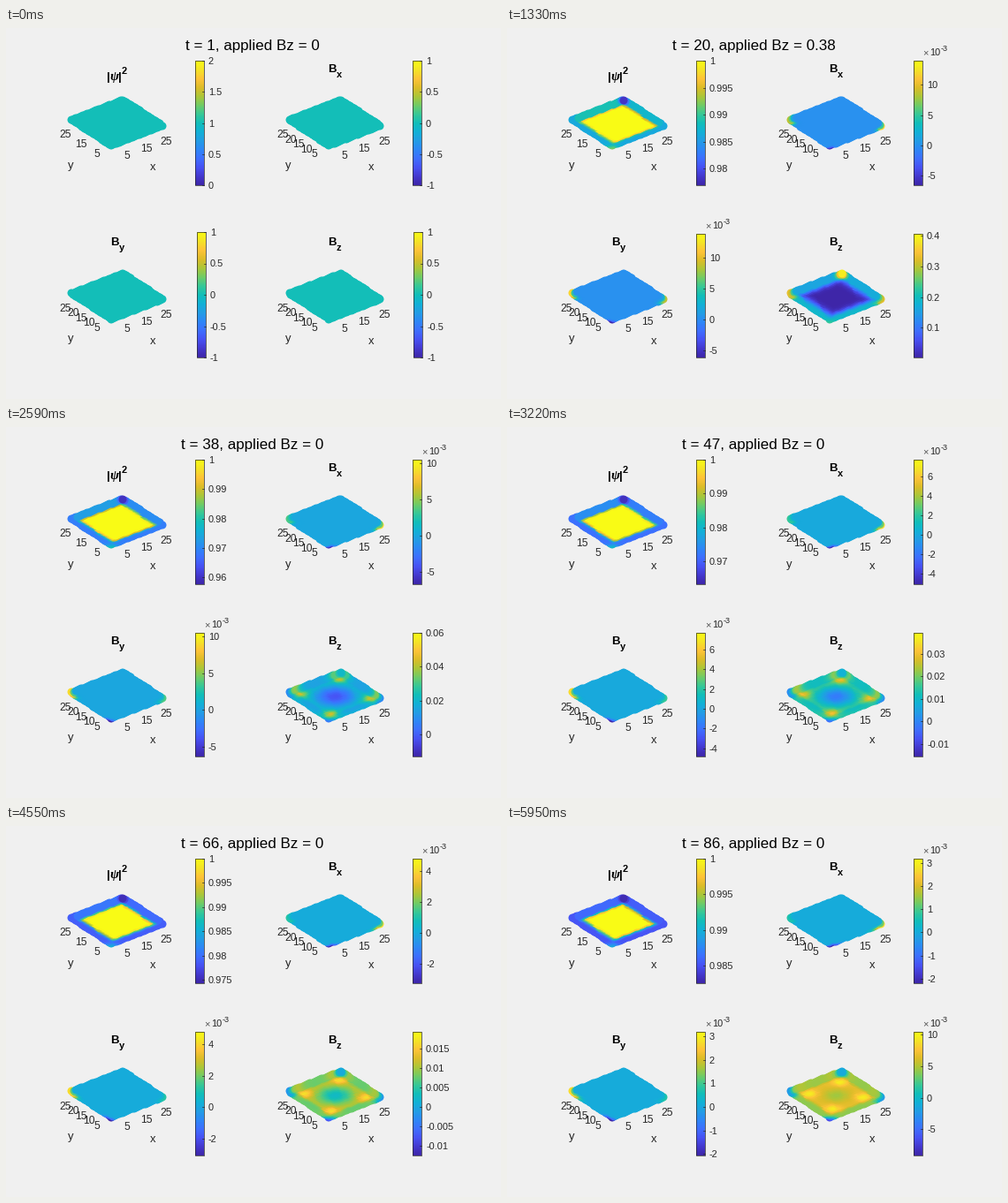
Write a matplotlib script that moves like this. It is 560 px wide and 420 px high and loops after 6020 ms.

```python
import numpy as np
import matplotlib.pyplot as plt
from matplotlib.animation import FuncAnimation
from matplotlib.colors import LinearSegmentedColormap
from matplotlib.patches import Rectangle

W, H, DPI = 560, 420, 100
STEPS, INTERVAL = 86, 70
RAMP_END = 20
INK = "#262626"
N = 28
SPAN = N - 1

plt.rcParams["font.family"] = "Liberation Sans"

PARULA = LinearSegmentedColormap.from_list("parula", [
    (.2422, .1504, .6603), (.270, .225, .815), (.2810, .3228, .9578),
    (.244, .4358, .9988), (.1786, .5289, .9682), (.135, .617, .897),
    (.0689, .6948, .8394), (.0704, .7457, .7258), (.2161, .7843, .5923),
    (.44, .80, .40), (.6720, .7793, .2227), (.8634, .7406, .1596),
    (.9970, .7659, .2199), (.961, .89, .153), (.9769, .9839, .0805)])

fig = plt.figure(figsize=(W / DPI, H / DPI), dpi=DPI, facecolor="#f0f0f0")
ax = fig.add_axes([0, 0, 1, 1])


def label(x, y, s, px, **kw):
    """Text at pixel position (baseline) with size in pixels."""
    kw.setdefault("color", INK)
    return ax.text(x, y, s, fontsize=px * 72 / DPI, va="baseline", **kw)


# ---- sample grid, drawn from the near corner to the far one ----
idx = np.arange(N) / SPAN
U, V = (a.ravel() for a in np.meshgrid(idx, idx))
order = np.argsort(.304 * U + .397 * V, kind="stable")
U, V = U[order], V[order]
PX = 119 + 58 * U - 44.5 * V
PY = 133 - 22.4 * U - 29 * V

# A dot shows mostly its lower part, so fields are read a little nearer.
S, T = U - .045, V - .055
EDGE = SPAN * np.clip(np.minimum(np.minimum(S, 1 - S), np.minimum(T, 1 - T)), 0, 1)


def bump(u, v, width):
    return np.exp(-(u ** 2 + v ** 2) * (SPAN / width) ** 2)


def rim(width):
    return np.exp(-(EDGE / width) ** 4)


# ---- colour limits: power-law growth in the ramp, then decay ----
def since_off(t):
    return max(0, t - RAMP_END)


def growth(t, power):
    return min(1, (t - 1) / (RAMP_END - 1)) ** power


def psi_limits(t):
    s = since_off(t)
    dev = .0626 * np.exp(-.0193 * s) * (1 - .631 * np.exp(-s / 6.6))
    return 1 - dev * growth(t, 4.3), 1


def side_limits(t, dip=1):
    s = since_off(t)
    peak = np.exp(np.interp(s, [0, 10, 27, 46, 66],
                            np.log([.01395, .01375, .0077, .0048, .0032])))
    ratio = (.69 - .22 * np.exp(-s / 12)) * growth(t, .8)
    hi = peak * growth(t, 1.716)
    return -hi * ratio * dip, hi


def bz_limits(t):
    s = since_off(t)
    hi = .406 * growth(t, 1.36) * np.exp(-.45 * np.sqrt(s))
    if s == 0:
        return .003 * growth(t, 12), hi
    return -.026 * np.exp(-.0158 * s) * max(0, 1 - np.exp(-(s - 10) / 7)), hi


# ---- fields, already scaled to 0..1 of the colour range ----
def psi_field(t):
    ring = .13 + .27 * np.exp(-since_off(t) / 25) + .12 * (1 - growth(t, 1))
    val = 1 - (1 - ring) * rim(2.1 + .012 * (t - 12))
    return val - ring * bump(1 - U, 1 - V, 1.3) + .25 * bump(U, V, 3)


def side_field(t, u, v):
    s = since_off(t)
    lo, hi = side_limits(t)
    zero = -lo / (hi - lo)
    reach = SPAN / (2 + .035 * s)
    fall = np.exp(-(v * SPAN / 1.1) ** 2)
    val = zero + .85 * (1 - zero) * np.exp(-((1 - u) * reach) ** 2) * fall
    val -= zero * np.exp(-(u * reach) ** 2) * fall
    return val + (.12 + .3 * np.exp(-s / 15)) * bump(u, 1 - v, 1.8)


def bz_field(t):
    s = since_off(t)
    if s == 0:
        val = .46 * np.exp(-(EDGE / 3.5) ** 2)
        top, side, near = .55, .35, .1
    else:
        r = 1 - np.exp(-s / 20)
        edge, mid = .1 + .6 * r, .2 + .63 * r
        pit = max(0, .0115 * s - .06)
        hole = 11.5 - .09 * s
        spot = .15 + .45 * np.exp(-s / 15)
        inset = (1.6 + .06 * s) / SPAN
        top, side, near = -.3 * r, -.35 * r, -.6 * r * r

        val = mid + (edge - mid) * rim(2.4)
        val -= (mid - pit) * bump(S - .5, T - .5, hole)
        for a in (inset, 1 - inset):
            for b in (inset, 1 - inset):
                val += spot * bump(S - a, T - b, 3.2)
    val += top * bump(1 - U, 1 - V, 2) + near * bump(U, V, 2.6)
    return val + side * (bump(1 - U, V, 2.2) + bump(U, 1 - V, 2.2))


# ---- ticks ----
def ticks(lo, hi):
    span = hi - lo
    base = 10.0 ** np.floor(np.log10(span))
    lead = span / base
    step = base * (.2 if lead < 1.5 else .5 if lead < 3.5 else 1 if lead < 7 else 2)
    first = np.ceil(lo / step - 1e-6)
    last = np.floor(hi / step + 1e-6)
    vals = np.arange(first, last + 1) * step
    power = 0
    if np.abs(vals).max() <= .01 + 1e-9:
        power = int(np.floor(np.log10(step) + 1e-9))
    return vals, power


class Panel:
    BAR_W = 10

    def __init__(self, ox, oy, limits, field, rest, rest_shift, y_step):
        self.ox, self.oy = ox, oy
        self.limits, self.field = limits, field
        self.rest, self.rest_shift = rest, rest_shift
        self.dots = ax.scatter(np.round(PX + ox), np.round(PY + oy),
                               s=(9 * 72 / DPI) ** 2, linewidths=0, zorder=2)
        self.bar = ax.imshow(np.linspace(1, 0, 256)[:, None], cmap=PARULA,
                             aspect="auto", extent=(0, 1, 1, 0), zorder=2)
        self.box = Rectangle((0, 0), self.BAR_W, 1, fill=False, ec=INK,
                             lw=.5, zorder=3)
        ax.add_patch(self.box)
        self.marks, = ax.plot([], [], color=INK, lw=.5, zorder=3)
        self.labels = [label(0, 0, "", 11) for _ in range(10)]
        self.times = label(0, 0, "×", 11, color="#555555")
        self.ten = label(0, 0, "10", 11)
        self.power = label(0, 0, "", 9)
        self.axes_text(y_step)

    def axes_text(self, y_step):
        ox, oy = self.ox, self.oy
        for s in (5, 15, 25):
            label(136.5 + 2.25 * (s - 5) + ox, 147.5 - .8 * (s - 5) + oy, str(s),
                  12, ha="center")
        for s in range(5, 26, y_step):
            label(103 - 1.8 * (s - 5) + ox, 146.3 - 1.1 * (s - 5) + oy, str(s),
                  12, ha="center")
        label(73 + ox, 159 + oy, "y", 13, ha="center")
        label(166.5 + ox, 161 + oy, "x", 13, ha="center")

    def draw(self, t):
        x0 = 213.5 + self.ox
        y0, y1 = (37, 178) if self.oy == 0 else (233, 373)
        if t == 1:
            lo, hi = self.rest
            val = np.full(U.size, .5)
            x0 += self.rest_shift[0]
            y0 += self.rest_shift[1]
        else:
            lo, hi = self.limits(t)
            val = self.field(t)
        self.dots.set_facecolors(PARULA(np.clip(val, 0, 1)))

        x1 = x0 + self.BAR_W
        self.bar.set_extent((x0, x1, y1, y0))
        self.box.set_xy((x0, y0))
        self.box.set_height(y1 - y0)

        vals, power = ticks(lo, hi)
        ys = y1 - (vals - lo) / (hi - lo) * (y1 - y0)
        for text in self.labels:
            text.set_text("")
        mx, my = [], []
        for text, v, y in zip(self.labels, vals, ys):
            text.set_text(f"{round(v / 10.0 ** power, 12) + 0.0:.5g}")
            text.set_position((x0 + 15.3, y + 4))
            mx += [x1 - 2, x1, np.nan]
            my += [y, y, np.nan]
        self.marks.set_data(mx, my)

        for text in (self.times, self.ten, self.power):
            text.set_visible(power != 0)
        self.times.set_position((x0 + 10.5, y0 - 6))
        self.ten.set_position((x0 + 18.5, y0 - 6))
        self.power.set_position((x0 + 31, y0 - 11))
        self.power.set_text(f"-{abs(power)}")


UNIT = (-1, 1)
RIGHT, DOWN = 246.3, 196.5
panels = [
    Panel(0, 0, psi_limits, psi_field, (0, 2), (0, 0), 10),
    Panel(RIGHT, 0, side_limits, lambda t: side_field(t, U, V), UNIT, (0, 0), 5),
    Panel(0, DOWN, lambda t: side_limits(t, .94), lambda t: side_field(t, V, U),
          UNIT, (2, -2), 5),
    Panel(RIGHT, DOWN, bz_limits, bz_field, UNIT, (1, -2), 5),
]

bold = dict(color="black", weight="bold")
label(114, 58.5, "|", 13.3, **bold)
label(117, 58.5, "ψ", 15, family="Liberation Serif", style="italic", **bold)
label(127.5, 58.5, "|", 13.3, **bold)
label(131, 52.5, "2", 11, **bold)
for x, y, sub in ((364, 50, "x"), (118, 246, "y"), (364, 246, "z")):
    label(x, y, "B", 13.3, **bold)
    label(x + 9.6, y + 5.5, sub, 11, **bold)
title = label(279, 25, "", 17, color="black", ha="center")

ax.set_xlim(0, W)
ax.set_ylim(H, 0)
ax.axis("off")


def update(i):
    t = i + 1
    applied = .02 * i if t <= RAMP_END else 0
    title.set_text(f"t = {t}, applied Bz = {applied:.4g}")
    for p in panels:
        p.draw(t)
    return []


anim = FuncAnimation(fig, update, frames=STEPS, interval=INTERVAL,
                     init_func=lambda: [], repeat=True, repeat_delay=0)
plt.show()
```
